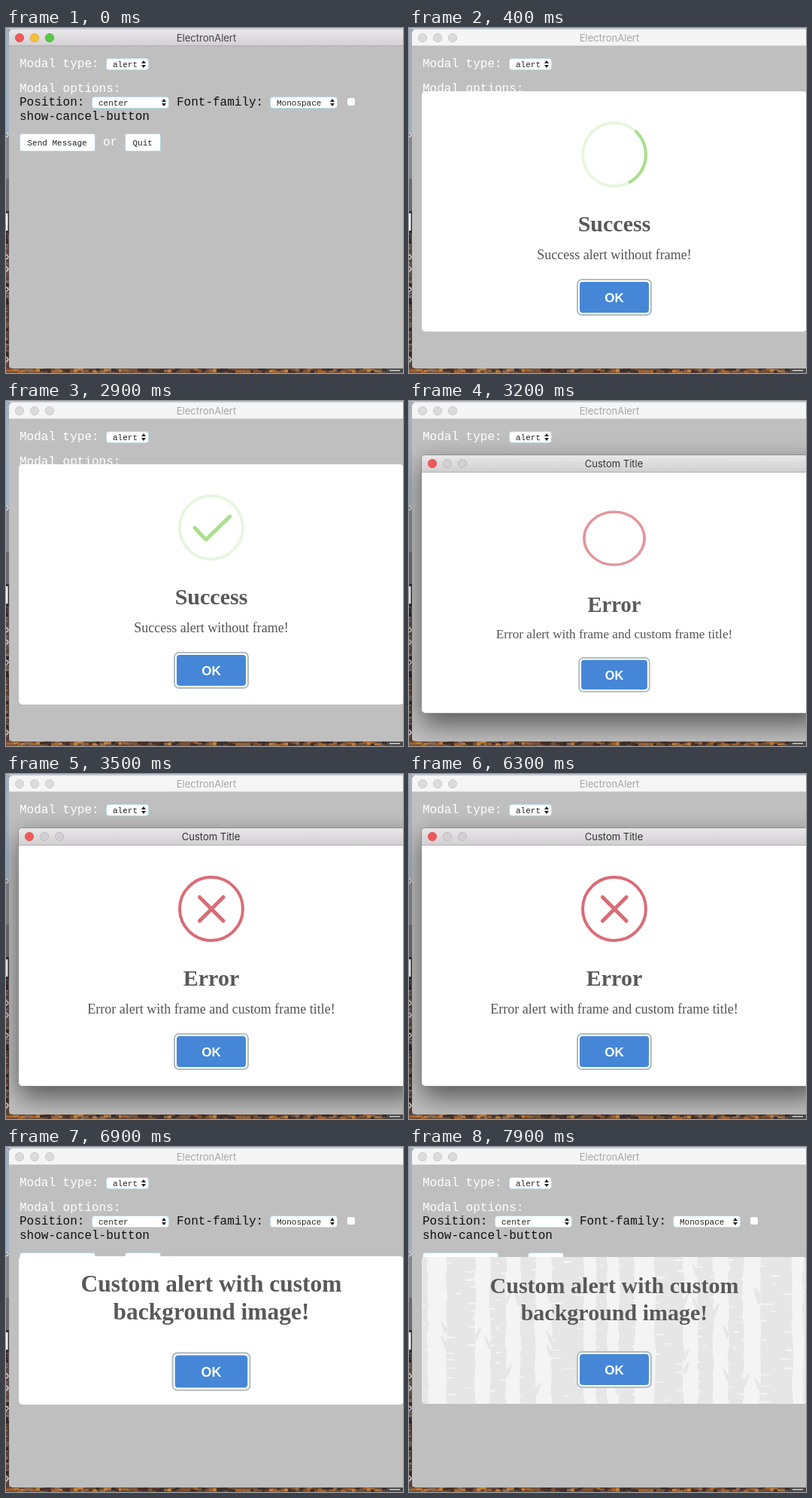
Write an HTML page that moves like this. It is 528 px wide and 458 px high and loops after 8000 ms.

```html
<!DOCTYPE html>
<html lang="en">
<head>
<meta charset="utf-8">
<title>ElectronAlert</title>
<style>
  html, body { margin: 0; width: 100%; height: 100%; overflow: hidden; background: #bfbfbf; }
  svg { display: block; width: 528px; height: 458px; }
  text { white-space: pre; }
  .mono { font: 16px "Liberation Mono", monospace; }
  .small { font-size: 11px; }
  .bar { font: 13px Inter, sans-serif; text-anchor: middle; }
  .title { font: bold 30px "Liberation Serif", serif; fill: #595959; text-anchor: middle; }
  .body { font: 18px "Liberation Serif", serif; fill: #545454; text-anchor: middle; }
  .ok { font: bold 17px "Liberation Sans", sans-serif; fill: #fff; text-anchor: middle; }
</style>
</head>
<body>
<svg id="stage" viewBox="0 0 528 458"></svg>
<script>
const LOOP = 8000, STEP = 100;
const CX = 273;

let seed = 11;
const rnd = () => (seed = (seed * 16807) % 2147483647) / 2147483647;
const between = (a, b) => a + rnd() * (b - a);

const rect = (x, y, w, h, fill, extra = '') =>
  `<rect x="${x}" y="${y}" width="${w}" height="${h}" fill="${fill}" ${extra}/>`;
const text = (x, y, str, cls, fill) =>
  `<text x="${x}" y="${y}" class="${cls}"${fill ? ` fill="${fill}"` : ''}>${str}</text>`;
const light = (x, y, fill, edge) =>
  `<circle cx="${x}" cy="${y}" r="5.6" fill="${fill}" stroke="${edge}" stroke-width=".8"/>`;
const lights = (x, y, colors) =>
  colors.map(([fill, edge], i) => light(x + 20 * i, y, fill, edge)).join('');

const RED = ['#f0595a', '#d94a4a'], AMBER = ['#f6be3b', '#dca42f'], GREEN = ['#58c847', '#46ab38'];
const OFF = ['#dcdadc', '#c6c4c6'], DIM = ['#d2d0d2', '#b8b6b8'];

function desktop() {
  let out = rect(0, 0, 528, 458, '#8b8f98') + rect(0, 0, 528, 2, '#c3cad2');
  const bands = [[0, 85, '#a3afbd'], [85, 55, '#9db0c8'], [140, 60, '#85878f'],
    [200, 43, '#6d6a70'], [243, 30, '#33302f'], [273, 90, '#55474a'], [363, 95, '#4a342c']];
  for (const [y, h, fill] of bands) out += rect(0, y, 4, h, fill);
  const tones = ['#5d4133', '#2f2422', '#81675b', '#6e594e'];
  for (let y = 275; y < 450; y += 4)
    out += rect(0, y, between(2, 4), between(2, 4), tones[rnd() * 4 | 0]);
  out += rect(0, 246, 2.5, 23, '#f4f4f4');
  for (const y of [139, 301, 317, 344, 437])
    out += `<path d="M0 ${y}q3 1 3 3t-3 3" fill="none" stroke="#e6e3e2" stroke-width="1.2"/>`;
  out += rect(0, 451, 528, 7, '#6b4a35');
  const warm = ['#4a3028', '#a4632e', '#7c5336', '#c2813d', '#3b302e', '#8d6a50'];
  for (let x = 0; x < 506; x += 5)
    out += rect(x, between(451, 455), between(4, 11), between(2, 5), warm[rnd() * 6 | 0]);
  return out + rect(506, 451, 22, 7, '#4d4b4a') + rect(510, 454, 14, 1.3, '#dedede');
}

function select(x, y, w, label, tx) {
  const ax = x + w - 7;
  return rect(x + .5, y + .5, w - 1, 15, '#fff', 'rx="3.5" stroke="#b9dbe5"') +
    text(tx, y + 11.5, label, 'mono small', '#222') +
    `<path d="M${ax - 3} ${y + 7}l3 -4l3 4zM${ax - 3} ${y + 9}l3 4l3 -4z" fill="#222"/>`;
}

const button = (x, w, label) =>
  rect(x + .5, 140.5, w - 1, 23, '#fff', 'rx="2.5" stroke="#b5d5e0"') +
  text(x + 10.5, 155.5, label, 'mono small', '#222');

function mainWindow() {
  return rect(4, 2, 540, 450, '#bfbfbf', 'rx="5"') +
    `<g id="active"><path d="M4 24V7q0 -5 5 -5H528V24z" fill="url(#bar)"/>
      ${rect(4, 23, 524, 1, '#aeacae')}${lights(18, 13, [RED, AMBER, GREEN])}
      ${text(266.5, 18, 'ElectronAlert', 'bar', '#444')}</g>
    <g id="idle"><path d="M4 24V7q0 -5 5 -5H528V24z" fill="#f5f5f5"/>
      ${rect(4, 23, 524, 1, '#d3d3d3')}${lights(18, 13, [OFF, OFF, OFF])}
      ${text(266.5, 18, 'ElectronAlert', 'bar', '#a6a6a6')}</g>` +
    text(18, 52, 'Modal type:', 'mono', '#fff') + select(133, 40, 57, 'alert', 142) +
    text(18, 85, 'Modal options:', 'mono', '#fff') +
    text(18, 103, 'Position:', 'mono', '#111') + select(114, 91, 103, 'center', 123) +
    text(227, 103, 'Font-family:', 'mono', '#111') + select(351, 91, 90, 'Monospace', 360) +
    rect(453.5, 92.5, 11, 11, '#fff', 'rx="2.5" stroke="#b4b4b4" stroke-width=".8"') +
    text(18, 122, 'show-cancel-button', 'mono', '#111') +
    button(18, 101, 'Send Message') + text(129, 156, 'or', 'mono', '#fff') + button(158, 48, 'Quit');
}

const okButton = y =>
  rect(224, y - 3, 98, 47, '#fff', 'rx="6" stroke="#b2bcc5" stroke-width="2"') +
  rect(227, y, 92, 41, '#4587d6', 'rx="4"') + text(CX, y + 27, 'OK', 'ok');

function successPopup() {
  return rect(17, 84, 512, 319, '#fff', 'rx="5"') +
    `<g fill="none" stroke="#a9df8b" stroke-linecap="round">
      <circle cx="${CX}" cy="168" r="42" stroke-width="4" stroke="#e8f6e0"/>
      <path id="arc" stroke-width="4" stroke-linecap="butt"/>
      <path id="tick" stroke-width="5" stroke-linejoin="round"/></g>` +
    text(CX, 270, 'Success', 'title') + text(CX, 307, 'Success alert without frame!', 'body') + okButton(337);
}

function errorWindow() {
  return rect(17, 84, 530, 345, '#000', 'rx="6" opacity=".55" filter="url(#blur)"') +
    rect(16.5, 71.5, 530, 343, '#fff', 'rx="5" stroke="#8d8d8d"') +
    '<path d="M17 95V77q0 -5 5 -5H528V95z" fill="url(#bar2)"/>' + rect(17, 94, 511, 1, '#b3b1b3') +
    lights(31, 83, [RED, DIM, DIM]) + text(272.5, 88, 'Custom Title', 'bar', '#333') +
    `<g id="errorBody"><g id="cross" fill="none" stroke="#d96c77">
      <circle cx="0" cy="0" r="42" stroke-width="4"/>
      <path id="mark" d="M-15.5 -15.5L16 16M16 -15.5L-15.5 16" stroke-width="5" stroke-linecap="round"/></g>` +
    text(CX, 281, 'Error', 'title') +
    text(CX, 318, 'Error alert with frame and custom frame title!', 'body') + okButton(348) + '</g>';
}

function birches() {
  let out = rect(17, 146, 512, 195, '#f4f4f4');
  const trunks = [[15, 10], [50, 38], [108, 21], [148, 20], [190, 43], [249, 15], [279, 21],
    [327, 38], [384, 21], [425, 20], [467, 43], [524, 10]];
  for (const [x, w] of trunks) {
    const right = [];
    let d = `M${x} 146`;
    for (let y = 146; y <= 341; y += 13) {
      d += `L${x + between(-1.5, 1.5)} ${y}`;
      right.unshift(`L${x + w + between(-1.5, 1.5)} ${y}`);
    }
    out += `<path d="${d}${right.join('')}z" fill="#e6e6e6"/>`;
    for (let y = between(150, 158); y < 338; y += between(8, 15)) {
      const len = between(.2, .5) * w, h = between(1.2, 2.6);
      const side = rnd();
      const sx = side < .4 ? x - 2 : side < .8 ? x + w - len + 2 : x + w * .3;
      out += `<path d="M${sx} ${y}q${len / 2} ${-h} ${len} 0q${-len / 2} ${h * 1.6} ${-len} 0z" fill="#f4f4f4"/>`;
    }
    for (let k = 0; w > 15 && k < 3; k++) {
      const y = between(160, 325), dir = rnd() < .5 ? -1 : 1;
      const sx = dir < 0 ? x + 1 : x + w - 1;
      out += `<path d="M${sx} ${y}l${dir * 7} -11l${dir * 2} 1l${dir * -6} 17z" fill="#e6e6e6"/>`;
    }
  }
  return out;
}

function customPopup() {
  return rect(17, 146, 512, 195, '#fff', 'rx="5"') +
    `<g id="trees" clip-path="url(#card)">${birches()}</g>` +
    text(CX, 194, 'Custom alert with custom', 'title') +
    text(CX, 230, 'background image!', 'title') + okButton(275);
}

const grad = (id, a, b) =>
  `<linearGradient id="${id}" x2="0" y2="1"><stop stop-color="${a}"/><stop offset="1" stop-color="${b}"/></linearGradient>`;
const clip = (id, y, h) => `<clipPath id="${id}">${rect(17, y, 512, h, '#fff', 'rx="5"')}</clipPath>`;

document.getElementById('stage').innerHTML =
  `<defs>${grad('bar', '#e9e7e9', '#d2d0d2')}${grad('bar2', '#e9e7e9', '#d0ced0')}
    ${clip('win1', 83, 321)}${clip('win3', 145, 197)}${clip('card', 146, 195)}
    <filter id="blur" x="-20%" y="-20%" width="140%" height="150%"><feGaussianBlur stdDeviation="17"/></filter></defs>` +
  desktop() + mainWindow() +
  `<g clip-path="url(#win1)"><g id="success">${successPopup()}</g></g>
   <g id="error">${errorWindow()}</g>
   <g clip-path="url(#win3)"><g id="custom">${customPopup()}</g></g>`;

const el = {};
document.querySelectorAll('[id]').forEach(n => el[n.id] = n);
const set = (id, name, v) => el[id].setAttribute(name, v);
const show = (id, on) => set(id, 'display', on ? 'inline' : 'none');

// CSS cubic-bezier timing, solved by bisection
function bezier(x1, y1, x2, y2) {
  const at = (u, a, b) => 3 * u * (1 - u) ** 2 * a + 3 * u * u * (1 - u) * b + u ** 3;
  return x => {
    let lo = 0, hi = 1;
    for (let i = 0; i < 24; i++) {
      const m = (lo + hi) / 2;
      if (at(m, x1, x2) < x) lo = m; else hi = m;
    }
    return at(lo, y1, y2);
  };
}
const ease = bezier(.25, .1, .25, 1), easeIn = bezier(.42, 0, 1, 1);

// keys: [progress, value] pairs
function keyed(p, keys, fn = ease) {
  if (p <= keys[0][0]) return keys[0][1];
  for (let i = 1; i < keys.length; i++) {
    const [p0, v0] = keys[i - 1], [p1, v1] = keys[i];
    if (p <= p1) return v0 + (v1 - v0) * fn((p - p0) / (p1 - p0));
  }
  return keys[keys.length - 1][1];
}

const popIn = ms => keyed(ms / 300, [[0, .7], [.45, 1.05], [.8, .95], [1, 1]]);
const popOut = ms => keyed(ms / 150, [[0, 1], [1, .5]]);

function pop(id, cy, s, opacity = 1) {
  set(id, 'transform', `translate(${CX} ${cy}) scale(${s}) translate(${-CX} ${-cy})`);
  set(id, 'opacity', opacity);
}

function drawSuccess(ms) {
  const turn = keyed(ms / 4250, [[.05, 0], [.12, 360]], easeIn);
  const a = turn < 180 ? 63 - turn : -135;
  const b = turn < 180 ? 63 : 225 - turn;
  const pt = deg => {
    const r = deg * Math.PI / 180;
    return `${CX + 42 * Math.cos(r)} ${168 + 42 * Math.sin(r)}`;
  };
  set('arc', 'd', b - a > .5 ? `M${pt(a)}A42 42 0 ${b - a > 180 ? 1 : 0} 1 ${pt(b)}` : '');

  // the stroke runs along the tick, overshoots, then settles
  const p = ms / 750;
  const head = keyed(p, [[.54, 0], [.7, 22], [.84, 74], [1, 66]]);
  const tail = keyed(p, [[.6, -10], [.7, 0], [.84, 7], [1, 0]]);
  const point = s => s < 22 ? `${251 + s * .68} ${168.5 + s * .7}` : `${266 + (s - 22) * .72} ${184 - (s - 22) * .695}`;
  const start = Math.max(0, tail);
  set('tick', 'd', head > .5 ? `M${point(start)}${head > 22 ? 'L266 184' : ''}L${point(head)}` : '');
}

function drawError(ms) {
  const p = ms / 500;
  const tilt = keyed(p, [[0, 100], [1, 0]]) * Math.PI / 180;
  set('cross', 'transform', `translate(${CX} 179) scale(1 ${Math.cos(tilt)})`);
  set('cross', 'opacity', keyed(p, [[0, 0], [1, 1]]));
  const size = keyed(p, [[.5, .4], [.8, 1.15], [1, 1]]);
  const dy = keyed(p, [[.5, 26], [.8, -6], [1, 0]]);
  set('mark', 'transform', `translate(0 ${dy}) scale(${size})`);
  set('mark', 'opacity', keyed(p, [[.5, 0], [1, 1]]));
}

function draw(t) {
  const active = t < 100 || (t >= 6500 && t < 6700);
  show('active', active);
  show('idle', !active);

  const first = t >= 100 && t < 3100;
  show('success', first);
  if (first) {
    drawSuccess(t - 40);
    if (t < 3000) pop('success', 243.5, popIn(t - 40));
    else pop('success', 243.5, popOut(50), .5);
  }

  const second = t >= 3200 && t < 6500;
  show('error', second);
  if (second) {
    drawError(t - 2990);
    if (t < 6400) pop('errorBody', 254.5, popIn(t - 2990));
    else pop('errorBody', 254.5, popOut(60), .4);
  }

  show('custom', t >= 6800);
  show('trees', t >= 7200);
  if (t >= 6800) pop('custom', 243.5, popIn(t - 6770));
}

const origin = performance.now();
function tick() {
  const t = (performance.now() - origin) % LOOP;
  draw(Math.floor(t / STEP) * STEP);
  requestAnimationFrame(tick);
}
tick();
</script>
</body>
</html>
```
